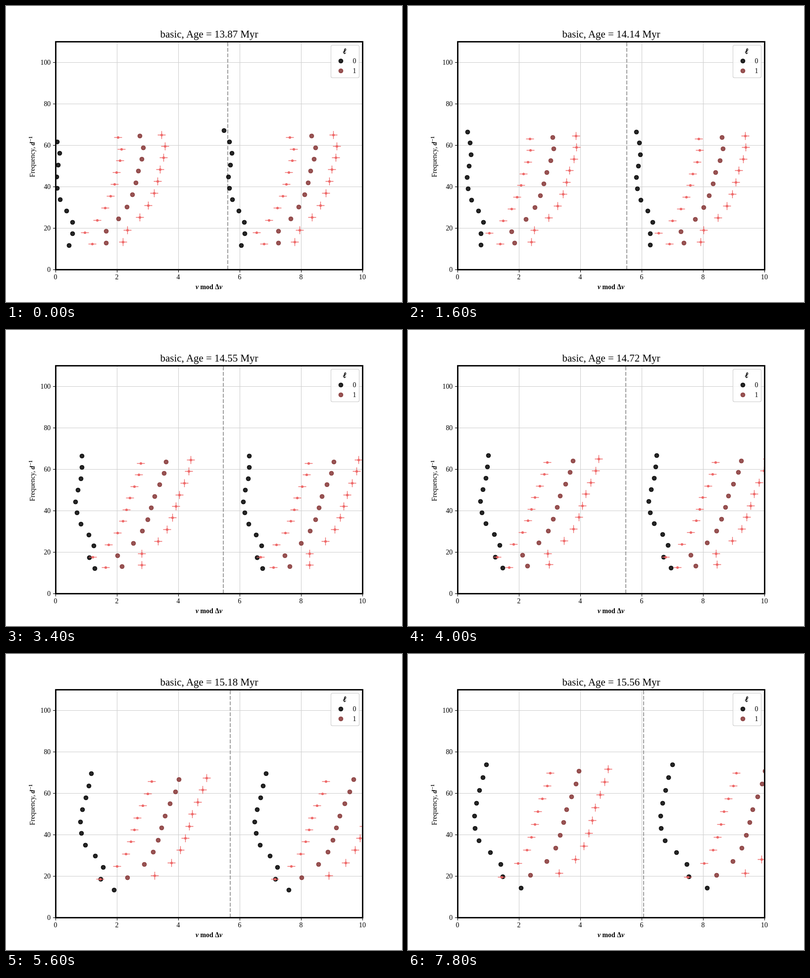
Animation, 800 px wide and 600 px high, one loop 8000 ms. Source, as an HTML page:

```html
<!DOCTYPE html>
<html lang="en">
<head>
<meta charset="utf-8">
<title>Echelle diagram</title>
<style>
  html, body { margin: 0; width: 100%; height: 100%; overflow: hidden; background: #fff; }
  svg { display: block; width: 800px; height: 600px; font: 13.89px "Liberation Serif", serif; }
  .grid { stroke: #cfcfcf; stroke-width: 1.1; }
  .tick { stroke: #000; stroke-width: 1.1; }
  .spine { fill: none; stroke: #000; stroke-width: 2.78; }
  .dash { stroke: #808080; stroke-opacity: .75; stroke-width: 2; stroke-dasharray: 7.7 3.33; }
  .radial, .dipole { stroke-width: 1.39; fill-opacity: .85; stroke-opacity: .85; }
  .radial { fill: #000; stroke: #000; }
  .dipole { fill: #863636; stroke: #863636; }
  .split { fill: #ee6464; stroke: #ee6464; stroke-width: 1.39; opacity: .95; }
  .mid { text-anchor: middle; }
  .end { text-anchor: end; }
  .bold { font-weight: bold; }
  .slant { font-weight: bold; font-style: italic; }
</style>
</head>
<body>
<svg viewBox="0 0 800 600">
  <defs>
    <clipPath id="area"><rect x="100" y="72" width="620" height="462"/></clipPath>
    <circle id="dot" r="4.17"/>
    <g id="minus"><circle r="1.9"/><path d="M-8 0H8"/></g>
    <g id="plus"><circle r="1.9"/><path d="M-8 0H8M0-8V8"/></g>
  </defs>
  <g id="axes"></g>
  <g id="plot" clip-path="url(#area)"></g>
  <rect class="spine" x="100.5" y="72.5" width="620" height="462"/>
  <text id="title" class="mid" x="410.5" y="64" font-size="20.95"></text>
  <text class="mid bold" x="410" y="574"><tspan class="slant">ν</tspan> mod Δ<tspan class="slant">ν</tspan></text>
  <text transform="translate(57.5 347) rotate(-90)">Frequency, <tspan class="slant">d</tspan><tspan class="bold" font-size="9.7" dx="1" dy="-5">−1</tspan></text>
  <rect x="656.5" y="79.5" width="57" height="66" rx="3" fill="#fff" fill-opacity=".8" stroke="#ccc" stroke-width="1.1"/>
  <text class="mid slant" x="684.5" y="96.5" font-size="16" stroke="#000" stroke-width=".5">ℓ</text>
  <use href="#dot" class="radial" x="676.5" y="111.5"/>
  <use href="#dot" class="dipole" x="676.5" y="131.5"/>
  <text x="700.5" y="116">0</text>
  <text x="700.5" y="136">1</text>
</svg>
<script>
const STEP = 200, STEPS = 40, DIPOLE_LOSS = 28;
const UNIT_X = 62, UNIT_Y = 4.2;

// Age in Myr at a few steps.
const ageSteps = [0, 8, 13, 20, 24, 33, 39];
const ages = [13.87, 14.14, 14.35, 14.72, 14.97, 15.39, 15.56];

// Ridge shapes in pixels at a few radial orders: early, halfway and late in age.
const orders = [2, 3, 4, 6, 8, 10, 12];
const radial = [
  [27, 34, 33.5, 9, 1.5, 8, -7.5],
  [91, 76, 85, 57, 46, 57, 62],
  [128, 91, 87, 43, 34, 44, 58]
];
const dipole = [
  [102, 102, 127, 155, 167, 177, 154],
  [141, 131, 164, 193, 207, 227, 236],
  [149, 147, 180, 207, 220, 239, 249]
];

// Cubic Hermite curve through the points (xs, ys).
function curve(xs, ys, x) {
  const last = xs.length - 1;
  const width = i => xs[i + 1] - xs[i];
  const slope = i => (ys[i + 1] - ys[i]) / width(i);
  const tangent = i => {
    if (i === 0) return 2 * slope(0) - tangent(1);
    if (i === last) return 2 * slope(last - 1) - tangent(last - 1);
    return (width(i - 1) * slope(i) + width(i) * slope(i - 1)) / (width(i - 1) + width(i));
  };
  let i = 0;
  while (i < last - 1 && x >= xs[i + 1]) i++;
  const w = width(i), u = (x - xs[i]) / w, v = 1 - u;
  return v * v * (1 + 2 * u) * ys[i] + u * u * (3 - 2 * u) * ys[i + 1]
    + w * u * v * (v * tangent(i) - u * tangent(i + 1));
}

// Parabola through three values at w = 0, 0.5 and 1, with an optional cubic skew.
function evolve(w, [early, half, late], skew = 0) {
  const a = 4 * half - 3 * early - late, b = 2 * (early + late - 2 * half);
  return early + a * w + b * w * w + skew * w * (w - .5) * (w - 1);
}

const $ = id => document.getElementById(id);

function drawAxes() {
  let out = '';
  for (let v = 0; v <= 10; v += 2) {
    const x = 100.5 + v * UNIT_X;
    if (v % 10) out += `<path class="grid" d="M${x} 72V534"/>`;
    out += `<path class="tick" d="M${x} 535v5"/><text class="mid" x="${x - .5}" y="554">${v}</text>`;
  }
  for (let v = 0; v <= 100; v += 20) {
    const y = 534.5 - v * UNIT_Y;
    if (v) out += `<path class="grid" d="M100 ${y}H720"/>`;
    out += `<path class="tick" d="M100 ${y}h-5"/><text class="end" x="90.3" y="${y + 4.5}">${v}</text>`;
  }
  $('axes').innerHTML = out;
}

function draw(step) {
  const age = curve(ageSteps, ages, step);
  const w = (age - ages[0]) / (ages.at(-1) - ages[0]);
  const period = evolve(w, [347.6, 339.8, 376], 35);
  const split = evolve(w, [43.6, 51.5, 58.1]);
  const offset = (shapes, n) => evolve(w, shapes.map(shape => curve(orders, shape, n)), -70);

  // A mode appears at its frequency modulo the spacing, and once more a spacing later.
  const snap = v => Math.round(v) + .5;
  const mark = (shape, style, n, dx) => {
    const y = 534 - (n * period + dx) / UNIT_X * UNIT_Y;
    const x = 100 + (dx + period) % period;
    return [x, x + period].map(px =>
      `<use href="#${shape}" class="${style}" x="${snap(px)}" y="${snap(y)}"/>`).join('');
  };

  let out = `<path class="dash" d="M${Math.round(100 + period)} 534V72"/>`;
  for (let n = 2; n <= 12; n++) out += mark('dot', 'radial', n, offset(radial, n));

  let sides = '';
  for (let n = step < DIPOLE_LOSS ? 2 : 3; n <= 11; n++) {
    const x = offset(dipole, n), even = split * (1 + (n - 7) * .0022);
    // The lowest order is split unevenly.
    const [left, right] = n === 2 ? [28.5 + 67 * w ** 3, 33.5 + 39 * w * w] : [even, even];
    out += mark('dot', 'dipole', n, x);
    sides += mark('minus', 'split', n, x - left) + mark('plus', 'split', n, x + right);
  }

  $('plot').innerHTML = out + sides;
  $('title').textContent = `basic, Age = ${age.toFixed(2)} Myr`;
}

let shown = -1;
function tick() {
  const step = Math.floor(performance.now() / STEP) % STEPS;
  if (step !== shown) draw(shown = step);
  requestAnimationFrame(tick);
}
drawAxes();
tick();
</script>
</body>
</html>
```
